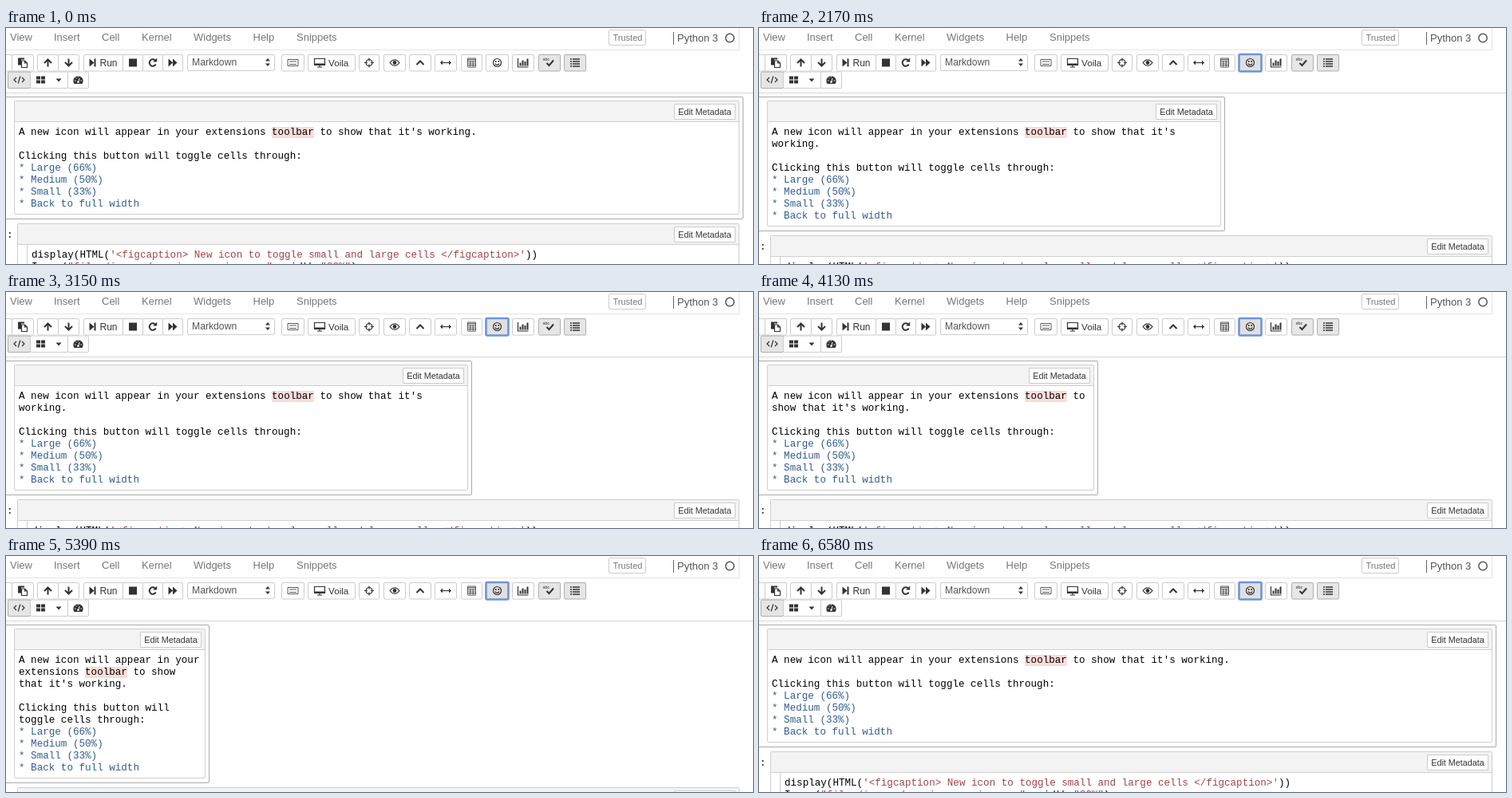
An HTML page that plays this animation: 936x296 px, repeating every 6860 ms.

```html
<!DOCTYPE html>
<html lang="en">
<meta charset="utf-8">
<title>Notebook cell width toggle</title>
<style>
html, body { margin: 0; width: 100%; height: 100%; overflow: hidden; background: #fff; }
body { position: relative; font-family: "Liberation Sans", Arial, sans-serif; }
* { box-sizing: border-box; }
svg { position: absolute; left: 0; top: 0; }
.btn { fill: #fff; stroke: #ccc; }
.btn.on { fill: #e6e6e6; stroke: #adadad; }
.icon { fill: #333; }
.line { fill: none; stroke: #333; stroke-width: 1.2; }
.thin { stroke-width: .8; }
.bold { stroke-width: 2; }
#cells { position: absolute; top: 86px; left: 0; width: 936px; }
#cell { margin-left: -6px; padding: 4px 4px 5px 15px; border: 1px solid #ababab; border-radius: 2px; }
#cell.edit { border-color: #7fb784; }
.input { position: relative; border: 1px solid #cfcfcf; border-radius: 2px; }
.bar { height: 26px; background: #f3f3f3; border-bottom: 1px solid #cfcfcf; }
.bar span { position: absolute; right: 4px; top: 3px; width: 77px; height: 20px; background: #fff;
  border: 1px solid #ccc; border-radius: 1px; font-size: 10.8px; line-height: 19px; text-align: center; color: #333; }
.code { padding: 6px 4px 4px 5px; font: 12.58px/15px "Liberation Mono", "Courier New", monospace;
  white-space: pre-wrap; color: #000; }
.code i { font-style: normal; color: #325c90; }
.code b { font-weight: normal; color: #a04444; }
mark { background: #fadcd9; color: inherit; }
#next { margin: 5px 0 0 14px; width: 905px; height: 80px; }
#next .code { margin-left: 11px; height: 53px; padding-left: 5px; border-left: 1px solid #cfcfcf; white-space: pre; }
#prompt { position: absolute; left: -14px; top: 7px; font: bold 12.58px/15px "Liberation Mono", monospace; color: #333; }
</style>
<body>
<svg id="ui" width="936" height="296" font-size="12"></svg>
<div id="cells">
  <div id="cell"><div class="input"><div class="bar"><span>Edit Metadata</span></div><div class="code">A new icon will appear in your extensions <mark>toolbar</mark> to show that it's working.

Clicking this button will toggle cells through:
<i>* Large (66%)
* Medium (50%)
* Small (33%)
* Back to full width</i></div></div></div>
  <div id="next" class="input"><div id="prompt">:</div><div class="bar"><span>Edit Metadata</span></div><div class="code">display(HTML(<b>'&lt;figcaption&gt; New icon to toggle small and large cells &lt;/figcaption&gt;'</b>))
Image(<b>"files/images/new-icon-resize.png"</b>, width=<b>"80%"</b>)</div></div>
</div>
<script>
const ui = document.getElementById('ui'), cell = document.getElementById('cell');
const path = (d, cls) => `<path class="${cls}" d="${d}"/>`;
const fill = d => path(d, 'icon');
const line = d => path(d, 'line');
const thin = d => path(d, 'line thin');
const bold = d => path(d, 'line bold');
const ring = (r, cls = 'line') => `<circle class="${cls}" r="${r}"/>`;
const text = (x, y, s, size, color) => `<text x="${x}" y="${y}" font-size="${size}" fill="${color}">${s}</text>`;
const at = (x, y, s) => `<g transform="translate(${x} ${y})">${s}</g>`;

// Icons are centred on 0,0
const icon = {
  none: '',
  paste: fill('M-6-6h8v2h-4v7h-4z') + line('M-1.5-2.5h4l3 3v5.5h-7zM2.5-2.5v3h3'),
  up: bold('M0 5V-4M-4.5 .5L0-4 4.5 .5'),
  down: bold('M0-5V4M-4.5-.5L0 4 4.5-.5'),
  run: at(-13.5, 0, fill('M-4-5L2 0-4 5zM2-5h2V5h-2z')) + text(-4.5, 4, 'Run', 12, '#333'),
  stop: fill('M-5-5h10v10h-10z'),
  restart: bold('M3.6 2A4.2 4.2 0 1 1 2.8-3') + fill('M5.2-6v5h-5z'),
  forward: fill('M-5.5-5L0 0-5.5 5zM0-5L5.5 0 0 5z'),
  keyboard: thin('M-6.5-4h13v8h-13zM-4.5-1.5h9M-4.5 2h9'),
  voila: at(-15, 0, line('M-6.5-5h13v8h-13zM-3 5.5h6M0 3v2') + fill('M-6.5 1h13v2.5h-13z')) + text(-4, 4, 'Voila', 11.7, '#333'),
  target: ring(4) + line('M0-6v4M0 6v-4M-6 0h4M6 0h-4'),
  eye: line('M-6 0Q0-7.5 6 0Q0 7.5-6 0z') + ring(2.4, 'icon'),
  chevron: bold('M-4.5 2.5L0-2 4.5 2.5'),
  wide: line('M-5 0h10') + fill('M-7 0l3-3v6zM7 0l-3-3v6z'),
  calc: thin('M-5-5.5h10v11h-10zM-5-2h10M-5 .5h10M-5 3h10M-1.7-2v7.5M1.7-2v7.5M-5-4h10'),
  smile: ring(5) + line('M-2.7 1.2Q0 4.5 2.7 1.2') + fill('M-2.5-2.5h1.5v2h-1.5zM1-2.5h1.5v2H1z'),
  chart: line('M-6.5-5.5v11h13') + fill('M-4.5 0h2v4h-2zM-1.5-3h2v7h-2zM1.5-1.5h2v5.5h-2zM4.5-5h2v9h-2z'),
  check: text(-8.5, -3, 'abc', 5.5, '#333') + bold('M-3.5 .5L-.5 3.5 5-3'),
  list: [-4.5, -1.5, 1.5, 4.5].map(y => fill(`M-6 ${y - .8}h2v1.6h-2zM-3 ${y - .8}h9v1.6h-9z`)).join(''),
  code: line('M-3.5-3L-6.5 0l3 3M3.5-3L6.5 0l-3 3M1.3-4.5l-2.6 9'),
  grid: at(-10.5, 0, fill('M-5.5-4.5h5v4h-5zM.5-4.5h5v4h-5zM-5.5 .5h5v4h-5zM.5 .5h5v4h-5z')) + at(12, 0, fill('M-3.5-1.5h7L0 2.5z')),
  gauge: fill('M-5 5A6.2 6.2 0 1 1 5 5z') +
    '<path d="M0 3L1.5-2M-4.5 1h1.5M3 1h1.5M-3.2-2.8l1 1M0-4.5v1.2" stroke="#fff"/><circle cy="2.8" r="1.3" fill="#fff"/>'
};
const button = (name, x0, x1, y = 33.5, on = '') =>
  `<rect id="${name}" class="btn ${on}" x="${x0 + .5}" y="${y}" width="${x1 - x0}" height="20.5" rx="1.5"/>` +
  at((x0 + x1) / 2 + .5, y + 10, icon[name]);

const menu = [['View', 5], ['Insert', 60], ['Cell', 120], ['Kernel', 170], ['Widgets', 235], ['Help', 309.5], ['Snippets', 364]];
const tools = [['none', -20, 7], ['paste', 7, 34], ['up', 39, 65], ['down', 65, 91], ['run', 97, 146],
  ['stop', 146, 171], ['restart', 171, 196], ['forward', 196, 221], ['keyboard', 345, 373], ['voila', 378, 437],
  ['target', 442, 467], ['eye', 473, 500], ['chevron', 505, 532], ['wide', 537, 564], ['calc', 570, 596],
  ['smile', 601, 629], ['chart', 634, 661]];

ui.innerHTML =
  '<path d="M0 27.5H918.5V0" fill="none" stroke="#e4e4e4"/><path d="M0 81.5H936" stroke="#e6e6e6" stroke-width="2"/>' +
  menu.map(([s, x]) => text(x, 16, s, 13, '#777')).join('') +
  '<rect class="btn" x="755.5" y="2.5" width="46" height="19" rx="1"/>' + text(760.5, 16, 'Trusted', 11, '#777') +
  '<g id="pencil" transform="translate(818 12.5)"><path d="M-5.5 5.5l1-4L2.5-5.5l3 3L-1.5 4.5z" fill="#555"/><path d="M.5-3.5l3 3M-4 2l2 2" stroke="#fff"/></g>' +
  '<path d="M836.5 5v16" stroke="#666"/>' + text(841, 17, 'Python 3', 13, '#555') +
  '<circle cx="907" cy="12.5" r="5.2" fill="none" stroke="#555" stroke-width="1.5"/>' +
  tools.map(b => button(...b)).join('') +
  button('check', 667, 694, 33.5, 'on') + button('list', 699, 726, 33.5, 'on') +
  button('code', 2, 30, 55, 'on') + button('grid', 30, 77, 55) + button('gauge', 77, 103, 55) +
  '<rect class="btn" x="227.5" y="33.5" width="109" height="20" rx="1.5"/>' + text(233, 47, 'Markdown', 12.2, '#555') +
  at(328, 43, fill('M-3-1.5h6L0-5zM-3 1.5h6L0 5z')) +
  '<rect id="focus" x="601.5" y="33" width="28" height="21.5" rx="1.5" fill="none" stroke="#6d95d8" stroke-width="2.6"/>';

const pencil = document.getElementById('pencil'), focusRing = document.getElementById('focus');
const smile = document.getElementById('smile');
const show = (el, on) => el.style.display = on ? '' : 'none';

const LOOP = 6860, EDIT = 1120, FOCUS = 1960;
const presses = [[1960, 2100], [3010, 3150], [3850, 4130], [5040, 5320]];
const resizes = [[0, 924], [2170, 584], [3220, 425], [4200, 255], [5460, 924]]; // time, right edge

function draw() {
  const t = performance.now() % LOOP;
  const edit = t >= EDIT && t < FOCUS, focused = t >= FOCUS;
  const pressed = presses.some(([a, b]) => t >= a && t < b);
  const right = resizes.filter(([start]) => t >= start).pop()[1];
  cell.style.width = right + 6 + 'px';
  cell.className = edit ? 'edit' : '';
  show(pencil, edit);
  show(focusRing, focused);
  smile.style.fill = pressed ? '#d0d0d0' : focused ? '#e0e0e0' : '#fff';
  requestAnimationFrame(draw);
}
draw();
</script>
</body>
</html>
```
